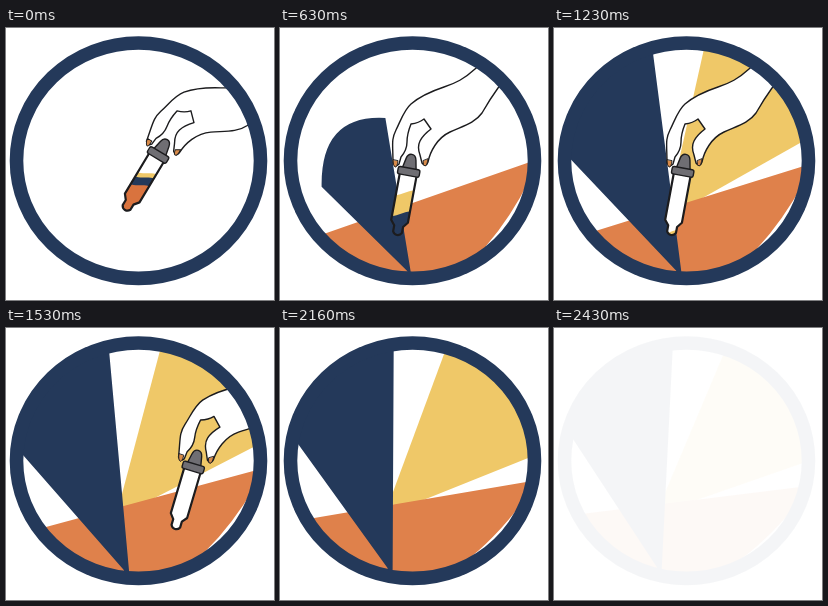
Animation, 268 px wide and 272 px high, one loop 2490 ms. Source, as an HTML page:

```html
<!DOCTYPE html>
<html lang="en">
<head>
<meta charset="utf-8">
<title>Dropper</title>
<style>
html, body { margin: 0; width: 100%; height: 100%; overflow: hidden; background: #fff; }
svg { display: block; width: 268px; height: 272px; }
</style>
</head>
<body>
<svg viewBox="0 0 268 272">
  <defs>
    <clipPath id="dish"><ellipse cx="132.5" cy="132.7" rx="117" ry="112.5"/></clipPath>
    <clipPath id="glass"><path d="M-8.5-62H8.5V-14L4.5-9V-3Q3 0 0 0T-4.5-3V-9L-8.5-14Z"/></clipPath>
  </defs>
  <g id="scene">
    <g clip-path="url(#dish)">
      <g id="wedges">
        <path id="yellow" fill="#efc868" d="M116 180L149 5Q275-25 267 98L136 178Z"/>
        <path id="orange" fill="#df814b"/>
        <path id="navy" fill="#24395a" d="M126 243L-10 109Q-12-6 91 0L131 243V262H126Z"/>
      </g>
      <g id="tool" stroke="#1c1c1e" stroke-width="1.4" stroke-linejoin="round" stroke-linecap="round">
        <path fill="#fff" d="M270-20L195 41C184 51 176 55 164 59S138 70 131 76S121 92 116 102S113 116 113 135
          Q115 140 119 136L121 129Q127 122 127 114T131 96Q139 95 144 91L151 101Q143 107 140 113T140 127
          L142 135Q146 140 148 134C150 124 157 110 170 104S195 95 202 85Q210 71 218 60L290-20"/>
        <path fill="#d88b4a" stroke-width=".9" d="M113 132Q113 138 115 139T118 133ZM143 133Q143 138 145 138T148 131Z"/>
        <g transform="translate(117 207) rotate(10.5)">
          <g stroke="none" clip-path="url(#glass)">
            <rect x="-10" y="-64" width="20" height="66" fill="#fff"/>
            <path id="topFluid" fill="#efc868"/>
            <path id="midFluid" fill="#24395a"/>
            <path id="lowFluid"/>
          </g>
          <path fill="none" stroke-width="2.2" d="M-8.500-62V-14L-4.500-9V-3Q-3 0 0 0T4.500-3V-9L8.500-14V-62"/>
          <path fill="#6f6e73" d="M-7-67Q-6-72-5-77Q-4-82 0-82T5-77Q6-72 7-67Z"/>
          <rect x="-11" y="-68" width="22" height="7.5" rx="2" fill="#6f6e73"/>
        </g>
      </g>
    </g>
    <ellipse cx="132.5" cy="132.7" rx="122" ry="117.7" fill="none" stroke="#24395a" stroke-width="13.6"/>
  </g>
</svg>
<script>
const LOOP = 2490, STEP = 30;
const $ = id => document.getElementById(id);
const set = (id, name, value) => $(id).setAttribute(name, value);
const span = (t, a, b) => Math.max(0, Math.min(1, (t - a) / (b - a)));
const smooth = u => u * u * (3 - 2 * u);
const easeOut = u => 1 - (1 - u) ** 2;
const mix = (a, b, u) => a.map((v, i) => v + (b[i] - v) * u);

// Wedge hinged beyond the left rim; k = 0 is half spread, k = 1 full
function pool(k) {
  const [x, y] = mix([187, 174], [258, 131.6], k);
  const bend = mix([184, 206], [234, 186], k);
  const foot = mix([177, 240], [206, 218], k);
  return `M-39 235L${x - 7} ${y + 2}Q${x} ${y} ${x - 2} ${y + 7}Q${bend} ${foot}V270H-39Z`;
}

function grow(id, u, x, y) {
  set(id, 'transform', `translate(${x} ${y}) scale(${u}) translate(${-x} ${-y})`);
}

function wedges(t) {
  const spin = 12.2 * span(t, 870, 2430) ** 1.25;
  set('wedges', 'transform', `rotate(${spin} 132.5 133)`);
  set('orange', 'd', pool(-1.5 + 2.5 * span(t, 135, 510)));
  grow('navy', easeOut(span(t, 520, 800)), 130, 244);
  grow('yellow', easeOut(span(t, 960, 1260)), 122, 180);
}

// Liquid up to a slanted, slightly wavy surface, draining between two times
function drain(id, t, height, from, to) {
  const h = height * (1 - span(t, from, to));
  set(id, 'd', h ? `M-10 2V${4 - h}C-3 ${4 - h} 3 ${-4 - h} 10 ${-4 - h}V2Z` : '');
}

function liquids(t) {
  drain('topFluid', t, 43, 900, 1260);
  drain('midFluid', t, 38, 500, 800);
  drain('lowFluid', t, 29, 260, 500);
  const brown = mix([217, 115, 62], [112, 72, 54], span(t, 180, 360));
  set('lowFluid', 'fill', `rgb(${brown.map(Math.round)})`);
}

function tool(t) {
  const away = 1 - smooth(span(t, 0, 270));
  const leave = Math.max(0, (t - 1230) / 300) ** 2;
  const x = 117 + 2 * away + 52 * leave;
  const y = 207 - 25 * away - 6 * leave;
  const angle = 20.5 * away + 6 * leave;
  set('tool', 'transform', `translate(${x} ${y}) rotate(${angle}) translate(-117 -207)`);
  set('tool', 'visibility', t < 1860 ? 'visible' : 'hidden');
}

function draw(time) {
  const t = Math.min(2430, Math.floor((time % LOOP) / STEP) * STEP);
  wedges(t);
  liquids(t);
  tool(t);
  set('scene', 'opacity', 1 - span(t, 2160, 2436) ** 1.95);
}

let start;
function tick(now) {
  start ??= now;
  draw(Math.max(0, now - start));
  requestAnimationFrame(tick);
}
draw(0);
requestAnimationFrame(tick);
</script>
</body>
</html>
```
